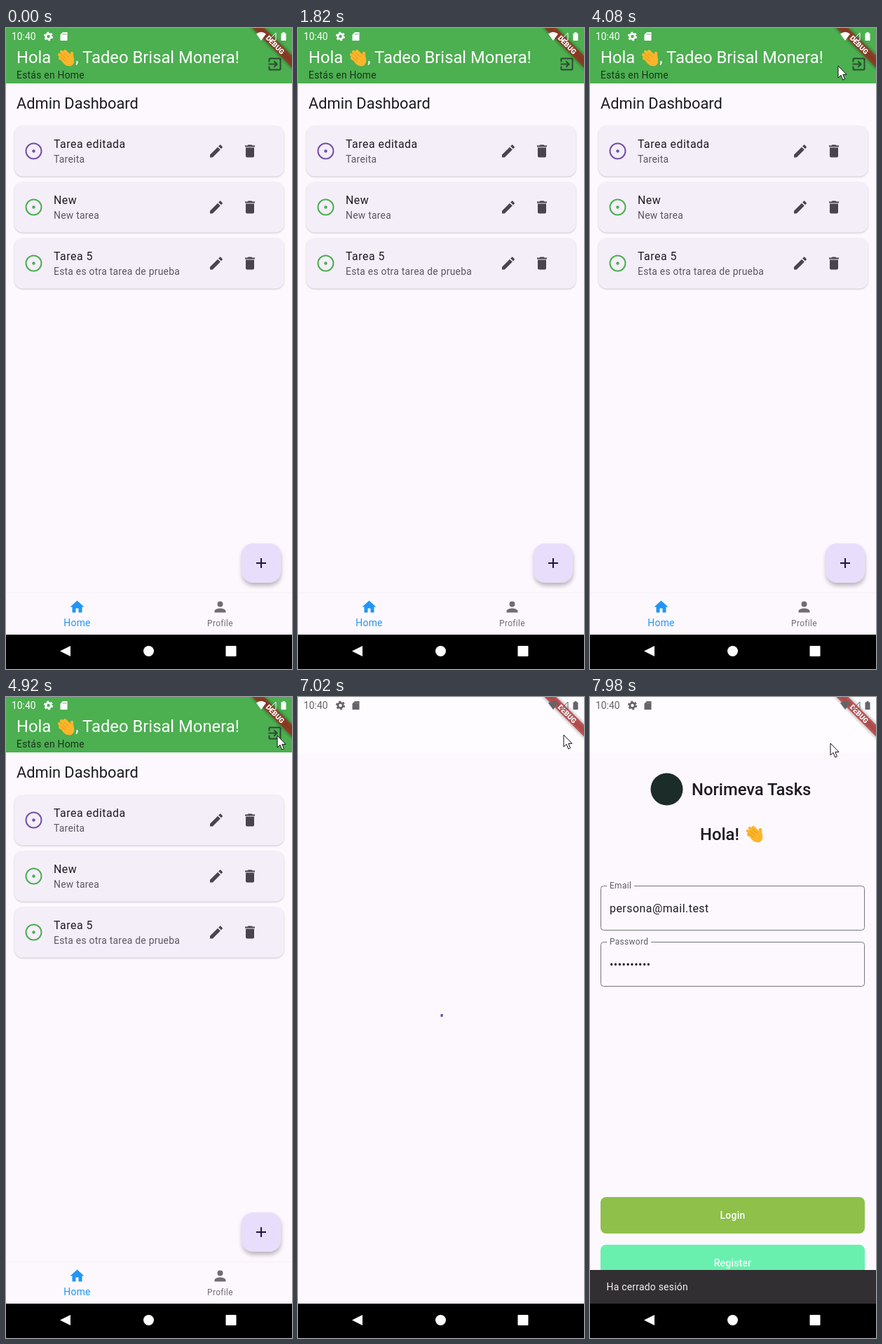
These frames come from a looping animation (408x914 px, 8000 ms). An HTML page:

```html
<!DOCTYPE html>
<html lang="es">
<head>
<meta charset="utf-8">
<title>Tareas</title>
<style>
  html, body { margin: 0; width: 100%; height: 100%; overflow: hidden; background: #000; }
  svg { display: block; width: 100vw; height: 100vh; }
  text { font-family: Roboto, sans-serif; font-size: 13.9px; letter-spacing: .25px; fill: #1d1b20; }
  .mid { text-anchor: middle; }
  .body { font-size: 15.9px; letter-spacing: .5px; }
  .small { font-size: 11.9px; letter-spacing: .35px; fill: #5f5b66; }
  .head { font-size: 23.8px; letter-spacing: 0; }
  .bold { font-weight: 500; }
  .light { fill: #fff; }
</style>
</head>
<body>
<svg viewBox="0 0 408 914" preserveAspectRatio="none">
  <defs>
    <filter id="soft" x="-30%" y="-30%" width="160%" height="160%"><feGaussianBlur stdDeviation="3"/></filter>
    <filter id="thin" x="-5%" y="-15%" width="110%" height="130%"><feGaussianBlur stdDeviation="1"/></filter>
    <path id="edit" d="M3 17.25V21h3.75L17.81 9.94l-3.75-3.75zM20.71 7.04c.39-.39.39-1.02 0-1.41l-2.34-2.34c-.39-.39-1.02-.39-1.41 0l-1.83 1.83 3.75 3.75z"/>
    <path id="trash" d="M6 19c0 1.1.9 2 2 2h8c1.1 0 2-.9 2-2V7H6zM19 4h-3.5l-1-1h-5l-1 1H5v2h14z"/>
    <g id="wave" fill="none" stroke="#fcb52a" stroke-width="4.4" stroke-linecap="round">
      <path d="M3 1L-7-8M0 3L-10-4M-1 6L-9 1M6-1L-2-9M8 4L8-6"/>
      <path d="M-4 5Q0 11 6 10Q11 7 8-1L2-2Z" fill="#fcb52a" stroke-linejoin="round"/>
      <path d="M-7-4.5L0 2M-8 0L-1 5M-3-6L3-1" stroke="#e08f18" stroke-width=".8"/>
    </g>
  </defs>

  <rect width="408" height="914" fill="#fdf8fe"/>

  <g id="home">
    <rect width="408" height="79" fill="#4caf50"/>
    <text class="head light" x="15" y="50">Hola</text>
    <use href="#wave" x="86" y="42"/>
    <text class="head light" x="99" y="50">, Tadeo Brisal Monera!</text>
    <text x="15" y="72" style="fill:#1c321e">Estás en Home</text>
    <path transform="translate(371.5 39.5)" fill="#2f4a35" d="M10.09 15.59L11.5 17l5-5-5-5-1.41 1.41L12.67 11H3v2h9.67zM19 3H5c-1.11 0-2 .9-2 2v4h2V5h14v14H5v-4H3v4c0 1.1.89 2 2 2h14c1.1 0 2-.9 2-2V5c0-1.1-.9-2-2-2z"/>
    <text x="15" y="114.5" style="font-size:21.8px;letter-spacing:0">Admin Dashboard</text>
    <g id="cards"></g>
    <rect x="337" y="739" width="55" height="56" rx="16" opacity=".28" filter="url(#soft)"/>
    <rect x="336" y="735" width="56" height="56" rx="16" fill="#e9ddfc"/>
    <path d="M357 763h14M364 756v14" stroke="#21104a" stroke-width="2"/>
    <path d="M0 805h408" stroke="#f3eef3"/>
    <path transform="translate(89.5 813.5)" fill="#2196f3" d="M10 20v-6h4v6h5v-8h3L12 3 2 12h3v8z"/>
    <path transform="translate(293.5 813.5)" fill="#716d73" d="M12 12a4 4 0 1 0 0-8 4 4 0 0 0 0 8zm0 2c-2.67 0-8 1.34-8 4v2h16v-2c0-2.66-5.33-4-8-4z"/>
    <text class="mid" x="101.5" y="853" style="fill:#2196f3">Home</text>
    <text class="mid small" x="305.5" y="853" style="fill:#716d73">Profile</text>
  </g>

  <g id="bar"><rect width="408" height="79" fill="#fffcff"/></g>

  <path id="spinner" fill="none" stroke="#6750a4" stroke-width="4"/>

  <g id="login">
    <circle cx="109.5" cy="131.5" r="23" fill="#1c2c28"/>
    <text class="head bold" x="145" y="139.5">Norimeva Tasks</text>
    <text class="head bold" x="157" y="204">Hola!</text>
    <use href="#wave" x="235" y="195"/>
    <g fill="none" stroke="#79747e">
      <path d="M24 269.5H19.5a4 4 0 0 0-4 4V328.5a4 4 0 0 0 4 4H387.5a4 4 0 0 0 4-4V273.5a4 4 0 0 0-4-4H63"/>
      <path d="M24 349.5H19.5a4 4 0 0 0-4 4V408.5a4 4 0 0 0 4 4H387.5a4 4 0 0 0 4-4V353.5a4 4 0 0 0-4-4H87"/>
    </g>
    <text class="small" x="28" y="273">Email</text>
    <text class="body" x="28" y="307">persona@mail.test</text>
    <text class="small" x="28" y="353">Password</text>
    <text class="body" x="28" y="387">••••••••••</text>
    <rect x="15" y="713" width="377" height="52" rx="8" fill="#8fc04a"/>
    <text class="mid bold light" x="203.5" y="744">Login</text>
    <rect x="15" y="781" width="377" height="52" rx="8" fill="#69f0ae"/>
    <text class="mid bold light" x="203.5" y="812">Register</text>
    <g id="snack">
      <rect y="817" width="408" height="48" fill="#322f33"/>
      <text x="23.5" y="846" style="fill:#f4eff4">Ha cerrado sesión</text>
    </g>
  </g>

  <g transform="translate(408 0) rotate(45)">
    <rect x="-44" y="28" width="88" height="12" opacity=".4" filter="url(#soft)"/>
    <rect x="-44" y="28" width="88" height="12" fill="#b71c1c" fill-opacity=".63"/>
    <text class="mid" y="37.6" style="font-size:10.2px;font-weight:900;letter-spacing:0;fill:#fff">DEBUG</text>
  </g>

  <g id="status">
    <text x="8" y="17" style="fill:inherit;letter-spacing:0">10:40</text>
    <circle cx="60.5" cy="12" r="3.6" fill="none" stroke="currentColor" stroke-width="2.8"/>
    <circle cx="60.5" cy="12" r="5.6" fill="none" stroke="currentColor" stroke-width="2" stroke-dasharray="2.9 2.964"/>
    <path d="M81 6h6.5v12h-10V9.5zM392.5 7.5h2V6h3v1.5h2V18h-7zM357 8.5q7-5.500 14 0L364 18z"/>
    <path d="M385 7V17.500H374.500z" fill="none" stroke="currentColor"/>
    <path d="M81.5 7.5v2.5M83.5 7.5v2.5M85.5 7.5v2.5" stroke="#888" stroke-width=".8"/>
  </g>

  <rect y="865" width="408" height="49"/>
  <g fill="#fff">
    <path d="M77 888.5L92 881V896z"/>
    <circle cx="203.5" cy="888.5" r="7.5"/>
    <rect x="313.5" y="881" width="15" height="15" rx="1"/>
  </g>

  <path id="cursor" d="M0 0V17L4 13.3L6.700 20L9.500 18.800L6.800 12.400H12Z" fill="#fff" stroke="#111" stroke-linejoin="round"/>
</svg>
<script>
const LOOP = 8000, LOGOUT = 6500, SPIN = 7120, LOGIN = 7180, SNACK_TIME = 250;
const $ = id => document.getElementById(id);

const tasks = [
  ['Tarea editada', 'Tareita', '#7350a8'],
  ['New', 'New tarea', '#4caf50'],
  ['Tarea 5', 'Esta es otra tarea de prueba', '#4caf50']
];
$('cards').innerHTML = tasks.map(([title, note, color], i) => `
  <g transform="translate(0 ${i * 80})">
    <rect x="12" y="140.5" width="384.5" height="72" rx="12" opacity=".2" filter="url(#thin)"/>
    <rect x="12" y="139.5" width="384.5" height="72" rx="12" fill="#f4eef9"/>
    <circle cx="39.5" cy="175.5" r="11" fill="none" stroke="${color}" stroke-width="2"/>
    <circle cx="39.5" cy="175.5" r="2.2" fill="${color}"/>
    <text class="body" x="68" y="170.5">${title}</text>
    <text x="68" y="192" style="fill:#5b5761">${note}</text>
    <g fill="#49454f"><use href="#edit" x="288" y="163.5"/><use href="#trash" x="336" y="163.5"/></g>
  </g>`).join('');

// time, x, y of the pointer tip; it comes in over the top edge
const pointer = [
  [3560, 388, -20], [4060, 354, 54], [4180, 354, 54], [4800, 387, 55],
  [5100, 387, 55], [5600, 379, 54], [7120, 379, 54], [7520, 390, 54], [7960, 343, 66]
];

const clamp = v => Math.min(1, Math.max(0, v));
const ease = v => { const p = clamp(v); return p * p * (3 - 2 * p); };
const show = (id, on) => $(id).setAttribute('visibility', on ? 'visible' : 'hidden');
const move = (id, x, y) => $(id).setAttribute('transform', `translate(${x} ${y})`);

function pointerAt(t) {
  const next = pointer.findIndex(k => k[0] > t);
  if (next < 0) return pointer.at(-1).slice(1);
  const [t0, x0, y0] = pointer[Math.max(0, next - 1)], [t1, x1, y1] = pointer[next];
  const p = t1 > t0 ? ease((t - t0) / (t1 - t0)) : 0;
  return [x0 + (x1 - x0) * p, y0 + (y1 - y0) * p];
}

function spinnerPath(ms) {
  const start = -Math.PI / 2 + ms / 2222 * 2 * Math.PI;
  const end = start + Math.max(.18, 1.5 * Math.PI * ease(ms / 667));
  const at = a => `${203.5 + 18 * Math.cos(a)} ${472 + 18 * Math.sin(a)}`;
  return `M${at(start)}A18 18 0 ${end - start > Math.PI ? 1 : 0} 1 ${at(end)}`;
}

function draw(now) {
  const t = now % LOOP, signedIn = t < LOGOUT;
  show('home', signedIn);
  show('bar', !signedIn);
  show('login', t >= LOGIN);
  show('spinner', !signedIn && t < LOGIN);
  show('cursor', t >= pointer[0][0]);
  const ink = signedIn ? '#fff' : '#66636a';
  $('status').setAttribute('style', `fill:${ink};color:${ink}`);
  $('spinner').setAttribute('d', spinnerPath(Math.max(0, t - SPIN)));
  move('snack', 0, 48 * (1 - ease((t - LOGIN) / SNACK_TIME)));
  move('cursor', ...pointerAt(t));
  requestAnimationFrame(draw);
}
requestAnimationFrame(draw);
</script>
</body>
</html>
```
